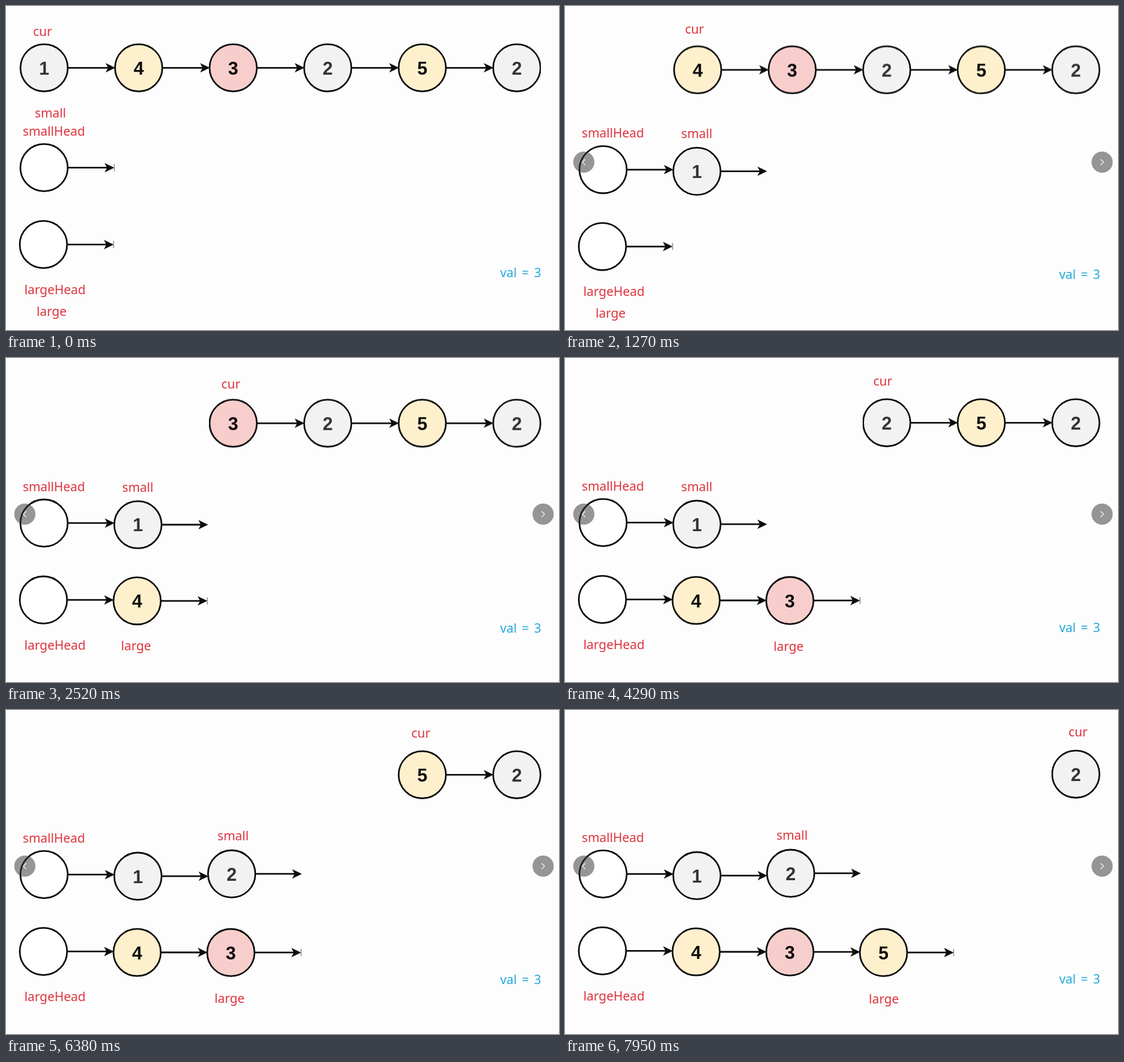
An HTML page for the animation above (7990 ms loop, 940 by 552 pixels).

```html
<!DOCTYPE html>
<html lang="en">
<head>
<meta charset="utf-8">
<title>Linked list partition</title>
<style>
  html, body { margin: 0; width: 100%; height: 100%; overflow: hidden; background: #fdfdfd; }
  svg { display: block; width: 940px; height: 552px; overflow: hidden; }
  circle.node { stroke: #0c0c0c; stroke-width: 2.8; }
  .line { stroke: #0c0c0c; stroke-width: 2.8; }
  .tip { fill: #0c0c0c; }
  .tick { stroke: #555; stroke-width: 1; }
  .digit { font: bold 31px "Liberation Sans", Arial, sans-serif; text-anchor: middle; }
  .label { font: 21.3px "Noto Sans", "Open Sans", sans-serif; fill: #de333d; }
  .val { fill: #22a9dc; word-spacing: 3px; }
  .nav circle { fill: rgba(50, 50, 50, .51); }
  .nav path { fill: none; stroke: #f2f2f2; stroke-width: 1.3; }

  #strip { animation: scenes 7990ms step-end infinite; }
  .nav { animation: appear 7990ms step-end infinite; }
  @keyframes scenes {
    0% { transform: translateY(0); }
    6.257% { transform: translateY(-552px); }
    29.912% { transform: translateY(-1104px); }
    53.692% { transform: translateY(-1656px); }
    77.847% { transform: translateY(-2208px); }
    98.498% { transform: translateY(-2760px); }
  }
  @keyframes appear {
    0% { opacity: 0; }
    6.257% { opacity: 1; }
  }
</style>
</head>
<body>
<svg viewBox="0 0 940 552">
  <g id="strip"></g>
  <g class="nav">
    <circle cx="32" cy="266" r="18"/>
    <path d="M34.5 261l-5 5 5 5"/>
    <circle cx="913" cy="266" r="18"/>
    <path d="M910.5 261l5 5-5 5"/>
  </g>
</svg>
<script>
  const R = 40.2;
  const FILL = { 1: '#f2f2f2', 2: '#f2f2f2', 3: '#f8cecc', 4: '#fff0cd', 5: '#fff0cd' };

  const node = (x, y, n) => ({ x, y, n });
  const INPUT = [1, 4, 3, 2, 5, 2].map((n, i) => node(64.8 + 160.7 * i, 105.3, n));
  const SMALL = [node(64.7, 275.4), node(224.2, 278.2, 1), node(383.6, 274.2, 2)];
  const LARGE = [node(63.6, 406.4), node(222.9, 408, 4), node(382.2, 408.2, 3), node(541.4, 409.2, 5)];

  // dy shifts the diagram; small and large count the linked nodes; labels are [x, baseline]
  const SCENES = [
    { dy: 0, small: 0, large: 0, cur: [46, 51], smallAt: [49, 190], largeAt: [52, 528], tick: true },
    { dy: 3.4, small: 1, large: 0, cur: [204, 46.5], smallAt: [197.5, 225], largeAt: [52, 531] },
    { dy: 5.8, small: 1, large: 1, cur: [366, 51.5], smallAt: [197.5, 228], largeAt: [195.5, 498], crop: true },
    { dy: 5, small: 1, large: 2, cur: [524, 46.5], smallAt: [197.5, 227], largeAt: [354.5, 498.5], crop: true },
    { dy: 5, small: 2, large: 2, cur: [689, 46.5], smallAt: [359.5, 222], largeAt: [354.5, 498.5] },
    { dy: 4, small: 2, large: 3, cur: [856, 44.5], smallAt: [359.5, 221], largeAt: [516.5, 499.5], crop: true }
  ];

  const label = (text, [x, y], cls = '') =>
    `<text class="label ${cls}" x="${x}" y="${y}">${text}</text>`;

  function circle({ x, y, n }) {
    const ink = n < 3 ? '#333' : '#0c0c0c';
    const digit = n ? `<text class="digit" fill="${ink}" x="${x}" y="${y + 11.5}">${n}</text>` : '';
    return `<circle class="node" cx="${x}" cy="${y}" r="${R}" fill="${FILL[n] || '#fff'}"/>${digit}`;
  }

  const arrow = (from, end) =>
    `<path class="line" d="M${from.x + R} ${from.y}H${end - 11}"/>` +
    `<path class="tip" d="M${end} ${from.y}l-16.5 8 4.2-8-4.2-8z"/>`;

  function chain(nodes, dangling, tick) {
    return nodes.map((p, i) => {
      const next = nodes[i + 1];
      if (next) return arrow(p, next.x - R + .5) + circle(p);
      if (!dangling) return circle(p);
      const end = p.x + 119.3;
      const mark = tick ? `<path class="tick" d="M${end} ${p.y - 6}v12"/>` : '';
      return arrow(p, end) + mark + circle(p);
    }).join('');
  }

  function scene(s, i) {
    const left = s.crop ? INPUT[i].x - 40.6 : 0;
    return `<g transform="translate(0 ${552 * i})">
      <clipPath id="clip${i}"><rect x="${left}" width="${909.3 - left}" height="552"/></clipPath>
      <g transform="translate(0 ${s.dy})">
        <g clip-path="url(#clip${i})">${chain(INPUT.slice(i))}</g>
        ${chain(SMALL.slice(0, s.small + 1), true, s.tick)}
        ${chain(LARGE.slice(0, s.large + 1), true, true)}
        ${label('smallHead', [28.5, 220.8])}
        ${label('largeHead', [31.3, 491])}
        ${label('val = 3', [840, 462], 'val')}
      </g>
      ${label('cur', s.cur)}${label('small', s.smallAt)}${label('large', s.largeAt)}
    </g>`;
  }

  document.getElementById('strip').innerHTML = SCENES.map(scene).join('');
</script>
</body>
</html>
```
